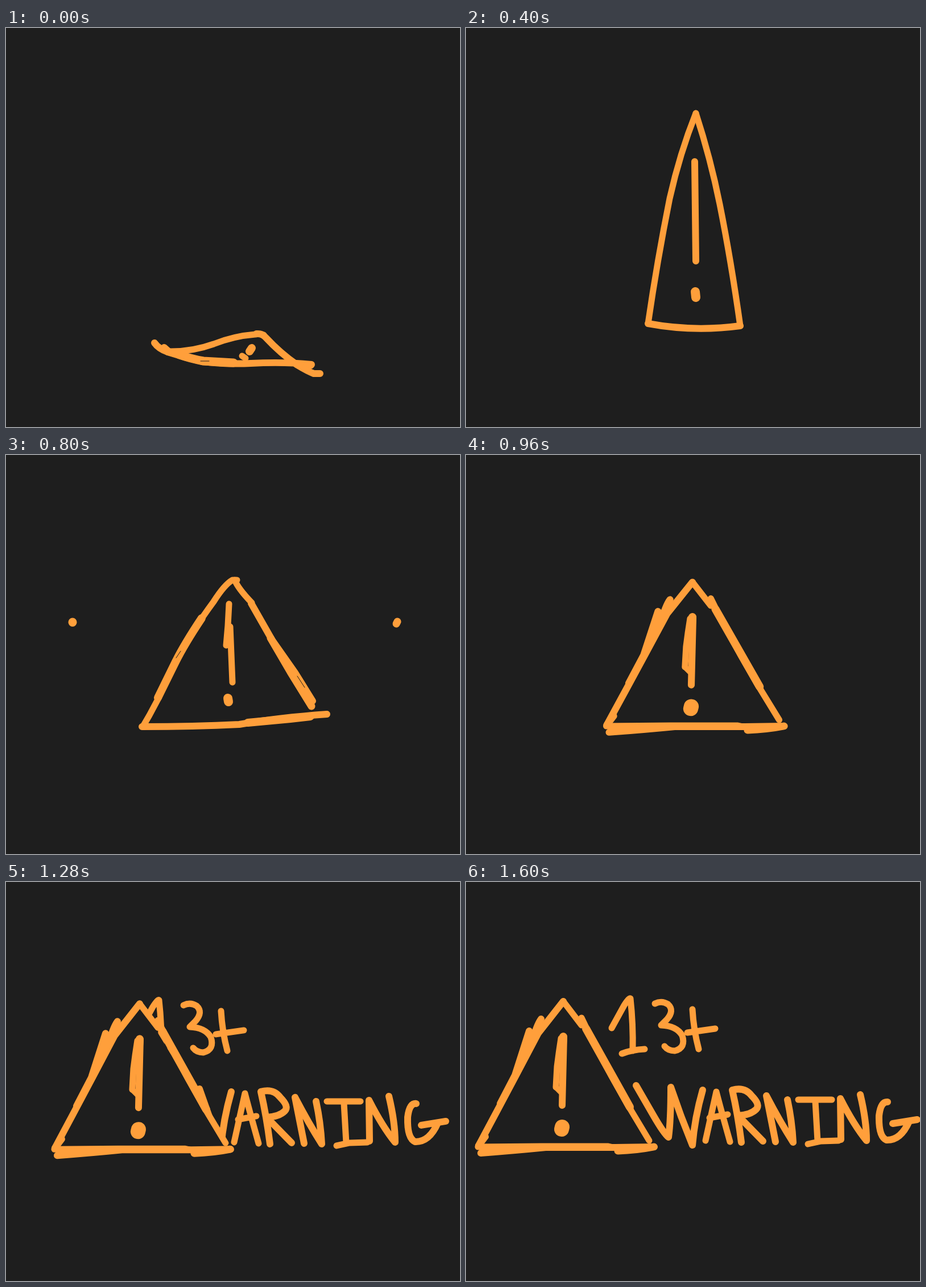
An HTML page with a canvas for the animation above (1.68 s loop, 798 by 702 pixels).

```html
<!DOCTYPE html>
<html lang="en">
<head>
<meta charset="utf-8">
<title>Warning sign</title>
<style>
  html, body { margin: 0; width: 100%; height: 100%; overflow: hidden; background: #1e1e1e; }
  canvas { display: block; width: 798px; height: 702px; }
</style>
</head>
<body>
<canvas id="stage" width="798" height="702"></canvas>
<script>
const INK = '#ff9f3b', PAPER = '#1e1e1e';
const LOOP = 1680, STEP = 80;
const ctx = document.getElementById('stage').getContext('2d');

// A drawing is a list of brush strokes: [width, path, colour].
const ink = (...strokes) => strokes.map(([w, d, c = INK]) => [w, new Path2D(d), c]);

const squash = ink(
  [12, 'M261 554Q268 564 284 570M278 562L287 570'],
  [12, 'M284 570Q315 580 345 587Q390 592 430 590Q490 587 537 592'],
  [15, 'M305 575Q325 582 347 586L400 589'],
  [14, 'M515 593L535 593'],
  [11, 'M285 569Q326 570 365 556Q400 542 438 539Q448 537 453 540'],
  [12, 'M440 538Q451 537 457 545Q482 572 512 593Q530 604 541 608L552 608'],
  [14, 'M432 563L428 569'],
  [11, 'M415 577L421 581'],
  [1, 'M342 586L357 586', PAPER]);

const leap = ink(
  [11, 'M427 127Q418 134 410 152L385 194L334 271'],
  [12, 'M427 127L421 135'],
  [12, 'M428 127Q416 174 425 200Q441 236 469 250L478 251'],
  [11, 'M319 263Q336 284 371 284Q410 284 470 258Q484 252 489 246'],
  [12, 'M319 263L326 269'],
  [12, 'M405 190L401 201'],
  [10, 'M404 195L400 211'],
  [11, 'M392 247L395 248']);

const trail = ink(
  [12, 'M324 363Q318 372 315 468'],
  [13, 'M372 507L374 526'],
  [14, 'M473 572L473 572.5']);

const fall = ink(
  [11, 'M404 150Q376 220 358 300Q336 410 320 520'],
  [11, 'M404 150Q430 230 446 310Q466 410 482 524'],
  [12, 'M320 520Q400 535 482 524'],
  [12, 'M402 235L404 410'],
  [16, 'M403 464L404 474']);

const tall = ink(
  [11, 'M397 211Q365 270 335 333Q312 390 296 445L272 522'],
  [12, 'M393 216L374 268Q350 325 332 370Q310 425 289 487'],
  [12, 'M296 447L284 485M389 222L370 260'],
  [12, 'M408 216L407 236'],
  [11, 'M408 217Q422 238 440 282L492 385L536 460'],
  [12, 'M436 275L455 318L489 389'],
  [10, 'M488 388Q515 446 528 484L546 538'],
  [11, 'M275 527Q340 536 365 532L384 526'],
  [11, 'M320 539Q400 543 470 544L546 532'],
  [11, 'M355 537Q420 538 480 531L535 523'],
  [14, 'M540 525L565 523'],
  [11, 'M405 271Q401 282 404 300L409 395L407 418'],
  [11, 'M405 300Q411 350 413 405'],
  [14, 'M408 488L408 509L415 509L413 494Z']);

const impact = ink(
  [12, 'M234 188L240 189M286 247L303 265'],
  [12, 'M247 184L294 250L315 277'],
  [11, 'M549 185L486 261M540 203L532 212'],
  [13, 'M518 227L485 263M491 270L485 276'],
  [11, 'M236 321Q257 325 269 336'],
  [13, 'M243 322L258 329'],
  [13, 'M537 354L550 348'],
  [9, 'M545 348L561 342']);

const burst = ink(
  [12, 'M212 147L254 200M568 147L528 197'],
  [12, 'M184 307L203 313M595 322L612 315']);

const sparks = ink([13, 'M152 300L160 302M646 304L654 301']);

const dots = ink(
  [15, 'M117 294L117 294.5'],
  [13, 'M688 293L686 297']);

const low = ink(
  [11, 'M406 220L398 220Q384 228 365 258Q326 311 302 356Q282 393 268 428L252 458L241 477'],
  [14, 'M344 287Q314 332 298 364L267 427'],
  [11, 'M402 220Q408 235 432 260'],
  [12, 'M431 261L468 326L508 383L539 433'],
  [13, 'M465 322L500 382L537 442'],
  [12, 'M239 478Q330 478 410 474Q480 462 564 456'],
  [14, 'M425 471L500 464L535 460'],
  [11, 'M392 262L390 300L387 335'],
  [11, 'M394 302L398 400'],
  [16, 'M390 428L391 434'],
  [1, 'M299 357L307 345M512 389L525 409', PAPER]);

const sign = ink(
  [12, 'M171 210L127 266L88 340L54 404L22 464'],
  [12, 'M132 241Q124 252 116 282M111 262L86 340L60 390M34 448L22 464'],
  [14, 'M118 275L98 310'],
  [11, 'M171 210L203 252'],
  [11, 'M203 239L217 268L255 340L286 395L322 455'],
  [14, 'M211 258L288 396'],
  [11, 'M21 466L133 465L250 465L268 469'],
  [12, 'M26 477Q90 472 140 467L262 467L331 466'],
  [13, 'M30 472L100 469M267 473Q300 472 330 466'],
  [14, 'M171 272L170 285'],
  [12, 'M172 273L169 393'],
  [11, 'M167 275Q163 300 160 325L158 361'],
  [10, 'M158 361L168 371'],
  [26, 'M169 431L168 435']);

const caption = ink(
  [11, 'M256 257L278 217Q287 203 289 205Q294 250 293 297M274 302Q292 295 314 294'],
  [11, 'M332 214Q344 208 355 215Q367 226 353 242L343 252Q370 253 380 270Q387 292 367 297Q355 297 349 289'],
  [11, 'M398 224Q400 260 409 294M389 265L438 258'],
  [12, 'M299 358L329 410Q348 443 356 449Q360 420 360 361L378 412L398 463Q402 415 416 366'],
  [11, 'M421 455Q432 405 440 369Q448 400 464 457M428 415L460 409'],
  [12, 'M484 458Q478 410 468 366Q490 360 502 376Q518 392 510 400Q500 410 478 411L522 456'],
  [12, 'M544 457L528 376Q552 422 575 458Q573 420 565 383'],
  [11, 'M584 383L643 383M614 386L618 456M601 461L624 456L655 455'],
  [12, 'M659 453L658 381Q682 428 704 455Q704 420 693 374'],
  [12, 'M741 387Q729 386 726 411Q725 448 739 454Q764 455 779 421M750 425L793 418']);

// Everything left of the sign's right edge hides the caption.
const beside = new Path2D('M44 0H1200V702H471Z');

function draw(art, x = 0, y = 0, sx = 1, sy = 1, cx = 0, cy = 0) {
  ctx.save();
  ctx.translate(x + cx, y + cy);
  ctx.scale(sx, sy);
  ctx.translate(-cx, -cy);
  for (const [w, path, colour] of art) {
    ctx.lineWidth = w;
    ctx.strokeStyle = colour;
    ctx.stroke(path);
  }
  ctx.restore();
}

function slide(t) {
  const left = 1 - (t - 1120) / 480;
  const near = left ** 2.12, far = left ** 5;
  const x = 151 * near, y = 10 * near;
  ctx.save();
  ctx.translate(x, y);
  ctx.clip(beside);
  ctx.translate(-x, -y);
  draw(caption, -152 * far, 22 * far);
  ctx.restore();
  draw(sign, x, y);
}

const poses = [
  [0, () => draw(squash)],
  [80, () => draw(squash, 0, 8, 1.02, 0.8, 557, 613)],
  [160, () => { draw(leap); draw(trail); }],
  [320, () => draw(leap, 0, -9)],
  [400, () => draw(fall)],
  [560, () => { draw(tall); draw(impact); }],
  [640, () => { draw(tall, 0, -18, 1.03, 0.92, 405, 535); draw(burst); }],
  [720, () => { draw(low, 0, 8, 1.03, 0.95, 402, 478); draw(sparks); }],
  [800, () => { draw(low); draw(dots); }],
  [880, () => draw(sign, 227, 11, 0.99, 1.03, 171, 470)],
  [960, () => draw(sign, 227, 11, 1.01, 0.99, 171, 470)],
  [1040, () => draw(sign, 227, 11)],
  [1120, slide]
];

const start = performance.now();

function render() {
  const now = Math.max(0, performance.now() - start) % LOOP;
  const t = Math.floor(now / STEP) * STEP;
  ctx.fillStyle = PAPER;
  ctx.fillRect(0, 0, 798, 702);
  ctx.lineCap = ctx.lineJoin = 'round';
  poses.filter(([from]) => from <= t).pop()[1](t);
  requestAnimationFrame(render);
}
render();
</script>
</body>
</html>
```
